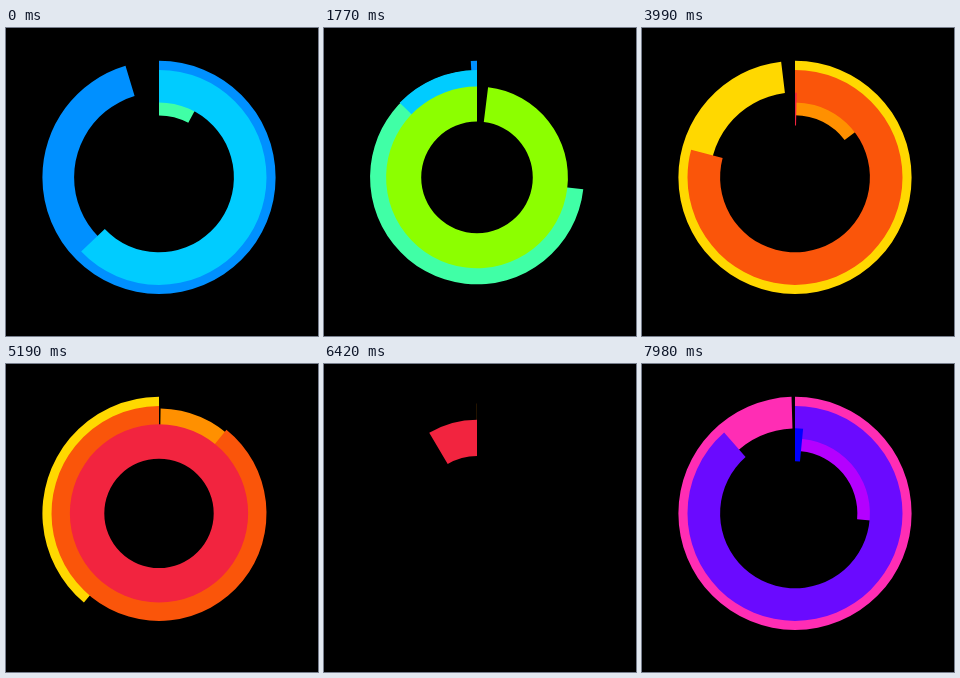
These frames come from a looping animation (312 px wide and 308 px high, 8000 ms). An HTML page with a canvas:

```html
<!DOCTYPE html>
<html lang="en">
<head>
<meta charset="utf-8">
<title>Colour rings</title>
<style>
  html, body { margin: 0; width: 100%; height: 100%; overflow: hidden; background: #000; }
  canvas { display: block; width: 312px; height: 308px; }
</style>
</head>
<body>
<canvas id="stage"></canvas>
<script>
const LOOP = 8000;
const PERIOD = 3900;
const CENTER = { x: 153, y: 149.4 };
const HEAD_MS = 1260;
const TAIL_MS = 1330;
const TAIL_DELAY = 1559;

// Bottom to top. Radii hold at phase 0; grow is the relative growth per ms.
const RINGS = [
  { color: 2, start: -345, inner: 61.9, outer: 99.7, grow: 4.1e-5 },
  { color: 0, start: -979, inner: 84.9, outer: 116.6, grow: 0 },
  { color: 1, start: -680, inner: 74.9, outer: 107.5, grow: 0 },
  { color: 3, start: 9, inner: 51.8, outer: 84.4, grow: 4.35e-5 }
];

const PALETTES = [
  ['#0090ff', '#00ccff', '#40ffa6', '#8cff00'],
  ['#ffd800', '#fa550a', '#ff9000', '#f2243f'],
  ['#ff2db4', '#6a0aff', '#b400ff', '#0000ff']
];

const canvas = document.getElementById('stage');
const ctx = canvas.getContext('2d');
const ratio = window.devicePixelRatio || 1;
canvas.width = 312 * ratio;
canvas.height = 308 * ratio;

// Equivalent to cubic-bezier(.7, 0, .3, 1), solved by bisection.
function ease(x) {
  if (x <= 0) return 0;
  if (x >= 1) return 1;
  let low = 0, high = 1, u = 0.5;
  for (let i = 0; i < 30; i++) {
    u = (low + high) / 2;
    const v = 1 - u;
    const bx = 2.1 * u * v * v + 0.9 * u * u * v + u * u * u;
    if (bx < x) low = u; else high = u;
  }
  return u * u * (3 - 2 * u);
}

function drawRing(ring, color, phase) {
  const age = phase - ring.start;
  const head = ease(age / HEAD_MS);
  const tail = ease((age - TAIL_DELAY) / TAIL_MS);
  if (head <= tail) return;
  const scale = 1 + ring.grow * phase;
  const angle = part => (part * 2 - 0.5) * Math.PI;
  ctx.beginPath();
  ctx.arc(CENTER.x, CENTER.y, ring.outer * scale, angle(tail), angle(head));
  ctx.arc(CENTER.x, CENTER.y, ring.inner * scale, angle(head), angle(tail), true);
  ctx.closePath();
  ctx.fillStyle = color;
  ctx.fill();
}

function draw(time) {
  ctx.setTransform(ratio, 0, 0, ratio, 0, 0);
  ctx.fillStyle = '#000';
  ctx.fillRect(0, 0, 312, 308);
  PALETTES.forEach((palette, i) => {
    for (const ring of RINGS) drawRing(ring, palette[ring.color], time - i * PERIOD);
  });
}

const begin = performance.now();
function tick() {
  draw((performance.now() - begin) % LOOP);
  requestAnimationFrame(tick);
}
draw(0);
requestAnimationFrame(tick);
</script>
</body>
</html>
```
